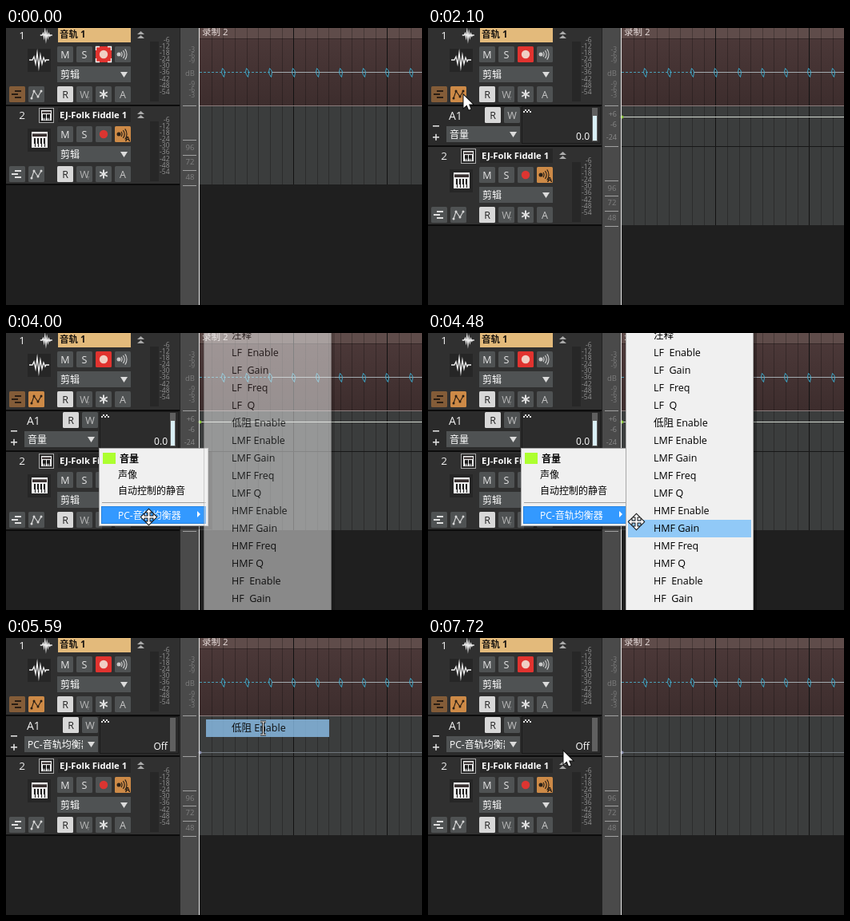
Write an HTML page with a canvas that moves like this. It is 520 px wide and 347 px high and loops after 8 s.

```html
<!DOCTYPE html>
<html lang="zh-CN">
<head>
<meta charset="utf-8">
<style>
html, body { margin: 0; width: 100%; height: 100%; overflow: hidden; background: #1f1f1f; }
canvas { display: block; }
</style>
</head>
<body>
<canvas id="stage" width="520" height="347"></canvas>
<script>
const stage = document.getElementById('stage').getContext('2d');
const layer = new OffscreenCanvas(520, 347).getContext('2d');
let ctx = stage;
const LOOP = 8000, STEP = 70;
const FONT = '"Open Sans", "Noto Sans CJK SC", "Noto Sans CJK", sans-serif';
const BUTTON = '#4f5253', LIGHT = '#d8d8d8', ORANGE = '#cd8a47', BEAT = 29.3;

const SUB_ITEMS = ['注释', 'LF  Enable', 'LF  Gain', 'LF  Freq', 'LF  Q', '低阻 Enable',
  'LMF Enable', 'LMF Gain', 'LMF Freq', 'LMF Q', 'HMF Enable', 'HMF Gain', 'HMF Freq',
  'HMF Q', 'HF  Enable', 'HF  Gain'];
const MENU_ITEMS = [['音量', 147, 20], ['声像', 167, 20], ['自动控制的静音', 187, 20], ['PC-音轨均衡器', 217, 22]];

// Pointer stops: time, x, y
const STOPS = [
  [260, 304, 296], [1030, 43, 83], [1160, 43, 83], [1230, 44, 83], [2360, 44, 83], [2780, 78, 134],
  [3440, 78, 134], [3790, 178, 230], [4270, 178, 230], [4480, 260, 236], [5110, 321, 126],
  [5320, 321, 113], [5590, 321, 113], [6280, 262, 130], [6560, 176, 138], [6750, 176, 138],
  [7160, 184, 268], [7580, 169, 154], [7650, 169, 148], [7720, 169, 141], [LOOP, 169, 141]];

const clamp = v => Math.max(0, Math.min(1, v));

function pointerAt(t) {
  const i = STOPS.findIndex(s => s[0] > t);
  if (i < 1) return [STOPS[0][1], STOPS[0][2]];
  const [t0, x0, y0] = STOPS[i - 1], [t1, x1, y1] = STOPS[i];
  const u = Math.floor((t - t0) / STEP) * STEP / (t1 - t0);
  const e = u * u * (3 - 2 * u);
  return [Math.round(x0 + (x1 - x0) * e), Math.round(y0 + (y1 - y0) * e)];
}

function box(x, y, w, h, color) {
  ctx.fillStyle = color;
  ctx.fillRect(x, y, w, h);
}
function frame(x, y, w, h, color) {
  ctx.strokeStyle = color;
  ctx.lineWidth = 1;
  ctx.strokeRect(x + .5, y + .5, w - 1, h - 1);
}
function path(points) {
  ctx.beginPath();
  points.forEach(([x, y]) => ctx.lineTo(x, y));
}
function line(points, color, width = 1) {
  path(points);
  ctx.strokeStyle = color;
  ctx.lineWidth = width;
  ctx.stroke();
}
function shape(points, color) {
  path(points);
  ctx.fillStyle = color;
  ctx.fill();
}
function dot(x, y, r, color) {
  ctx.beginPath();
  ctx.arc(x, y, r, 0, 7);
  ctx.fillStyle = color;
  ctx.fill();
}
function text(s, x, y, size, color, align = 'left', weight = 400) {
  ctx.font = `${weight} ${size}px ${FONT}`;
  ctx.textAlign = align;
  ctx.fillStyle = color;
  ctx.fillText(s, x, Math.round(y + size * .39));
}
function button(x, y, label, bg = BUTTON, color = '#e6e6e6') {
  ctx.beginPath();
  ctx.roundRect(x, y, 20, 20, 1.5);
  ctx.fillStyle = bg;
  ctx.fill();
  if (label) text(label, x + 10, y + 10, 12.5, color, 'center');
}
function dropdown(x, y, label) {
  box(x, y, 92, 20, BUTTON);
  ctx.save();
  ctx.beginPath();
  ctx.rect(x, y, 73, 20);
  ctx.clip();
  text(label, x + 4, y + 10, 12, '#fff');
  ctx.restore();
  shape([[x + 79, y + 7], [x + 88, y + 7], [x + 83.5, y + 14]], '#dcdcdc');
}

function waveIcon(x, y, s) {
  const zigzag = [[-12, 0], [-8, 0], [-6, -4], [-4, 5], [-2, -9], [0, 9], [2, -6], [4, 5], [6, -3], [8, 2], [9, 0], [13, 0]];
  line(zigzag.map(([a, b]) => [x + a * s, y + b * s]), '#f2f2f2', 1.3);
}
function keysIcon(x, y, w, h) {
  box(x, y, w, h, '#ececec');
  box(x + 1, y + h * .12, w - 2, h * .18, '#383030');
  for (let i = 1; i < 5; i++) {
    const key = Math.round(x + i * w / 5);
    box(key - 1, y + h * .4, 2, h * .35, '#1c1c1c');
    box(key, y + h * .4, 1, h * .55, '#1c1c1c');
  }
}
function echoIcon(y, color) {
  dot(141, y, 2.5, color);
  [5, 8, 11].forEach(r => {
    ctx.beginPath();
    ctx.arc(140, y, r, -.65, .65);
    ctx.strokeStyle = color;
    ctx.lineWidth = 1.2;
    ctx.stroke();
  });
}
function envelopeIcon(x, y, color) {
  const nodes = [[x - 6, y + 5], [x - 3, y - 4], [x + 2, y + 3], [x + 6, y - 4]];
  line(nodes, color, 1.1);
  nodes.forEach(([a, b]) => dot(a, b, 1.5, color));
}

function track(n, y, laneOpen, hover, brackets) {
  const first = n === 1;
  text(n, 20, y + 8.5, 13.5, '#f0f0f0', 'center');
  if (first) {
    waveIcon(50, y + 9, .6);
    box(65, y, 91, 18, '#e3ba7b');
    text('音轨 1', 67, y + 8, 11.5, '#1c1712', 'left', 700);
  } else {
    box(41, y, 19, 19, '#262626');
    frame(41, y, 19, 19, '#aaa');
    keysIcon(44, y + 3, 13, 13);
    box(65, y, 91, 18, '#272727');
    text('EJ-Folk Fiddle 1', 67, y + 9, 11.25, '#fff', 'left', 700);
  }
  [4, 9].forEach(d => {
    shape([[164, y + d + 4], [168.5, y + d], [173, y + d + 4]], '#aaa');
  });

  box(27, y + 26, 29, 29, '#262626');
  first ? waveIcon(41, y + 40, 1) : keysIcon(32, y + 30, 20, 20);

  button(64, y + 23, 'M');
  button(88, y + 23, 'S');
  button(112, y + 23, '', first ? '#e1332f' : BUTTON);
  dot(122, y + 33, 5.2, first ? '#f0cfc4' : '#dc3531');
  if (first && brackets) {
    for (const sx of [-1, 1]) for (const sy of [-1, 1])
      line([[122 + sx * 5, y + 33 + sy * 9.5], [122 + sx * 9.5, y + 33 + sy * 9.5], [122 + sx * 9.5, y + 33 + sy * 5]], '#fff', 1.3);
  }
  button(136, y + 23, '', first ? BUTTON : ORANGE);
  echoIcon(y + 33, first ? '#c8c8c8' : '#2b2118');
  if (!first) text('A', 152, y + 38, 9, '#1d1712', 'center', 700);

  dropdown(64, y + 48, '剪辑');

  button(4, y + 73, '', first ? '#835c38' : BUTTON);
  const bars = first ? '#2a1e14' : '#e0e0e0';
  [[11, 78], [7, 82], [11, 86]].forEach(([x, d]) => box(x, y + d, 8, 2, bars));
  button(28, y + 73, '', first && laneOpen ? ORANGE : first && hover ? '#66696a' : BUTTON);
  envelopeIcon(38, y + 83, first && laneOpen ? '#2a1e14' : '#d8d8d8');
  button(64, y + 73, 'R', LIGHT, '#222');
  button(88, y + 73, 'W', BUTTON, '#b4b4b4');
  text('T', 103, y + 88, 6, '#999', 'center');
  button(112, y + 73);
  for (let i = 0; i < 3; i++) {
    const a = Math.PI / 2 + i * Math.PI / 3, c = Math.cos(a) * 5.5, s = Math.sin(a) * 5.5;
    line([[122 - c, y + 83 - s], [122 + c, y + 83 + s]], '#e0e0e0', 2);
  }
  button(136, y + 73, 'A', BUTTON, '#c8c8c8');

  box(180, y + 17, 11, 75, '#272727');
  for (let i = 1; i <= 9; i++) text(-6 * i, 204.5, y + 6.2 + i * 8.15, 8.5, '#929292', 'right');
}

function lane(equalizer) {
  box(0, 98, 217, 50, '#2b2b2b');
  box(6, 122, 8, 1.6, '#ddd');
  box(6, 136, 8, 1.6, '#ddd');
  box(9.2, 132.8, 1.6, 8, '#ddd');
  text('A1', 26, 110, 14, '#f0f0f0');
  button(71, 99, 'R', LIGHT, '#222');
  button(95, 99, 'W', BUTTON, '#c0c0c0');
  dropdown(23, 123, equalizer ? 'PC-音轨均衡器' : '音量');
  box(117, 98, 99, 47, '#1b1b1b');
  box(118, 99, 97, 45, '#2c2c2c');
  for (let i = 0; i < 5; i++) box(119 + i * 2, i % 2 ? 102 : 104, 2, 2, '#ddd');
  text(equalizer ? 'Off' : '0.0', 202, 135, 12, '#fff', 'right');
  box(205, 100, 7, 42, '#606060');
  if (!equalizer) box(206, 110, 5, 31, '#d9eff6');
  box(0, 147, 217, 2, '#0c0c0c');
}

function burst(x, y) {
  const outline = [[-2, 0], [-1, -5], [1, -3], [2, 0], [1, 6], [-1, 3], [-2, 0]];
  line(outline.map(([a, b]) => [x + a + .5, y + b]), '#3da9cb');
}

function timeline(laneOpen, equalizer, shift) {
  const bottom = 196 + shift;
  box(217, 0, 1, 347, '#222');
  box(218, 0, 23, 347, '#4a4a4a');
  box(242, 98, 278, bottom - 98, '#3b3d3d');
  const body = ctx.createLinearGradient(0, 13, 0, 97);
  body.addColorStop(0, '#4b3838');
  body.addColorStop(1, '#3d2d2d');
  box(242, 13, 278, 84, body);
  box(242, 0, 278, 13, '#5f4c4a');
  box(242, 13, 278, 1, '#352828');
  for (let k = 1; k < 19; k++)
    box(Math.round(242 + k * BEAT / 2), 0, 1, bottom, k % 8 ? 'rgba(0,0,0,.25)' : '#121212');
  text('录制 2', 245, 5, 11.5, '#e6dcda');
  box(242, 97, 278, 1, '#8b7c7c');

  for (let x = 242; x < 332; x += 5) box(x, 55, 3, 1, '#4b9db4');
  box(332, 55, 188, 1, '#a2abb0');
  for (let k = 1; k < 10; k++) burst(Math.round(242 + k * BEAT), 55.5);

  ['-3', '-6', '-9', 'dB', '-9', '-6', '-3'].forEach((s, i) =>
    text(s, 236, [27, 34, 41, 56, 70, 77, 84][i], i === 3 ? 9.5 : 8.5, '#7c7c7c', 'right'));
  box(221, 97, 17, 1, '#a0a0a0');
  const y = 100 + shift;
  [40, 59, 78, 97].forEach(d => box(221, y + d, 17, 1, '#a0a0a0'));
  ['96', '72', '48'].forEach((s, i) => text(s, 230, y + 49 + i * 18.6, 9.5, '#808080', 'center'));

  if (laneOpen) {
    box(221, 148, 17, 1, '#a0a0a0');
    box(242, 148, 278, 1, '#171717');
    if (!equalizer) ['+6', '-6', '-24'].forEach((s, i) => text(s, 236, [107, 120, 136][i], 9, '#8a8a8a', 'right'));
    box(242, equalizer ? 143 : 111, 278, 1, equalizer ? '#6f767c' : '#d2d8cf');
    dot(242.5, equalizer ? 143.5 : 111.5, 2, equalizer ? '#8d93b0' : '#8cc63f');
  }
  box(241, 0, 1, 347, '#e8e8e8');
}

function panel(x, y, w, h) {
  box(x + 4, y + 4, w, h, 'rgba(0,0,0,.3)');
  box(x, y, w, h, '#f0f0f0');
  frame(x, y, w, h, '#a8a8a8');
}

function menu(px, py, subOpen) {
  panel(116, 144, 137, 98);
  box(121, 150, 16, 14, '#adff2f');
  box(120, 212, 130, 1, '#a0a0a0');
  MENU_ITEMS.forEach(([label, y, h], i) => {
    const hot = subOpen ? i === 3 : px > 117 && px < 252 && py >= y && py < y + h;
    if (hot) {
      box(119, y, 131, h, '#3399ff');
      frame(119, y, 131, h, '#2683e0');
    }
    const color = hot ? '#fff' : '#000';
    text(label, i ? 140 : 142, y + h / 2, 12, color, 'left', i ? 400 : 700);
    if (i === 3) shape([[239, y + 6], [243, y + 10], [239, y + 14]], color);
  });
}

function subItem(i, hot) {
  const y = 2.5 + i * 22;
  if (hot) box(250, y - 10.5, 154, 22, '#91c9f7');
  text(SUB_ITEMS[i], 282, y, 12.5, '#000');
}
function submenu(px, py) {
  panel(247, -5, 160, 360);
  SUB_ITEMS.forEach((s, i) => subItem(i, px > 250 && Math.floor((py + 8) / 22) === i));
}

function outlined(points) {
  path(points);
  ctx.closePath();
  ctx.lineJoin = 'miter';
  ctx.lineWidth = 2;
  ctx.strokeStyle = '#111';
  ctx.stroke();
  ctx.fillStyle = '#fff';
  ctx.fill();
}
// Polygon built from one arm repeated around the centre
function arms(x, y, count, size) {
  const points = [];
  for (let i = 0; i < count; i++) {
    const a = i * 2 * Math.PI / count, c = Math.cos(a), s = Math.sin(a);
    [[-1, -1.2], [-1, 5 - size], [-3.5, 5 - size], [0, 1.5 - size], [3.5, 5 - size], [1, 5 - size], [1, -1.2]]
      .forEach(([u, v]) => points.push([x + u * c - v * s, y + u * s + v * c]));
  }
  outlined(points);
}
function pointer(kind, x, y) {
  if (kind === 'move') arms(x + .5, y + .5, 4, 11);
  else if (kind === 'split') arms(x + .5, y + .5, 2, 11);
  else if (kind === 'beam') {
    const strokes = [[[x - 3, y - 8], [x + 4, y - 8]], [[x + .5, y - 8], [x + .5, y + 8]], [[x - 3, y + 8], [x + 4, y + 8]]];
    strokes.forEach(s => line(s, '#111', 3));
    strokes.forEach(s => line(s, '#fff', 1));
  } else {
    outlined([[0, 1], [0, 17], [4, 13.5], [6.5, 19.5], [9, 18.5], [6.5, 12.5], [11.5, 12.5]]
      .map(([a, b]) => [x + a + .5, y + b]));
  }
}

// Draws on a separate layer so that the group fades as one
function faded(alpha, draw) {
  if (alpha <= 0) return;
  layer.clearRect(0, 0, 520, 347);
  ctx = layer;
  draw();
  ctx = stage;
  ctx.globalAlpha = clamp(alpha);
  ctx.drawImage(layer.canvas, 0, 0);
  ctx.globalAlpha = 1;
}

function render(t) {
  const [px, py] = pointerAt(t);
  const laneOpen = t >= 2030, equalizer = t >= 5520, shift = laneOpen ? 51 : 0;
  const hover = t >= 330 && px >= 28 && px < 48 && py >= 73 && py < 93;

  box(0, 0, 520, 347, '#1f1f1f');
  box(0, 0, 217, 196 + shift, '#303030');
  timeline(laneOpen, equalizer, shift);
  track(1, 0, laneOpen, hover, t < 1960);
  track(2, 100 + shift, laneOpen, false, false);
  box(0, 96, 217, 2, '#0c0c0c');
  box(0, 195 + shift, 217, 2, '#0c0c0c');
  if (laneOpen) lane(equalizer);

  if (t < 1960) faded((t - 1450) / 180, () => {
    panel(43, 104, 102, 19);
    text('显示自动化轨道', 50, 113.5, 12, '#444');
  });
  if (t < 5520) {
    faded((t - 3050) / 200, () => menu(px, py, t >= 3900));
    faded((t - 3900) / 200, () => submenu(px, py));
  } else {
    faded(1 - (t - 5520) / 280, () => subItem(5, true));
  }

  if (t >= 330) {
    const busy = t >= 1560 && t < 1960 || t >= 2980 && t < 5520;
    const onEdge = t > 6000 && px < 217 && Math.abs(py - 148) < 3;
    pointer(busy ? 'move' : onEdge ? 'split' : px > 242 ? 'beam' : 'arrow', px, py);
  }
}

const start = performance.now();
function tick() {
  render((performance.now() - start) % LOOP);
  requestAnimationFrame(tick);
}
tick();
</script>
</body>
</html>
```
